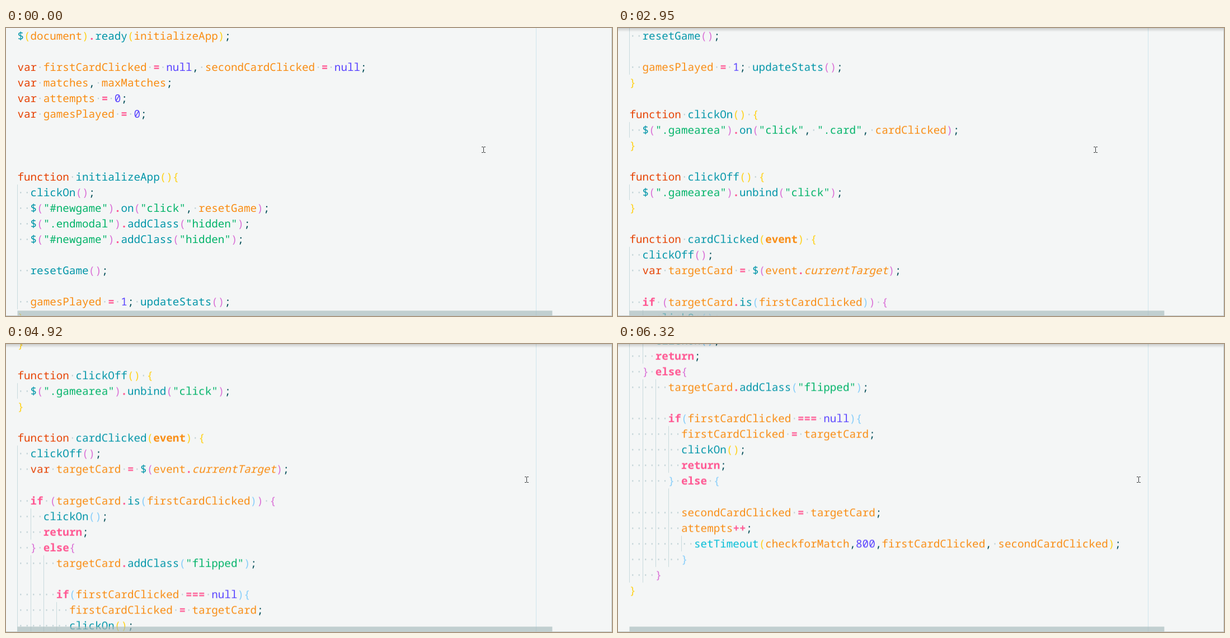
An HTML page that plays this animation: 1083x517 px, repeating every 8 s.

```html
<!DOCTYPE html>
<html lang="en">
<head>
<meta charset="utf-8">
<title>Code scrolling in an editor</title>
<style>
  html, body { margin: 0; width: 100%; height: 100%; overflow: hidden; background: #f4f6f6; }
  svg { display: block; width: 1083px; height: 517px; }
  text {
    font: 19.28px "Noto Sans Mono", "DejaVu Sans Mono", monospace;
    text-rendering: geometricPrecision;
    fill: #004d57;
  }
  .space { fill: #bccfd3; }
  .storage { fill: #e64100; }
  .control { fill: #ff5792; font-weight: bold; }
  .call { fill: #0095a8; }
  .builtin { fill: #00bdd6; }
  .name { fill: #f98c12; }
  .param { fill: #f98c12; font-weight: bold; }
  .prop { fill: #f98c12; font-style: italic; }
  .string { fill: #00b368; }
  .value { fill: #5842ff; }
  .depth0, .depth1, .depth2 { font-weight: 500; }
  .depth0 { fill: #ffd21a; }
  .depth1 { fill: #da70d6; }
  .depth2 { fill: #87cefa; }
  .guide { fill: #c8dadd; shape-rendering: crispEdges; }

  #code, #pointer, #shade { animation: 8s step-end infinite; }
  #code { animation-name: scroll; }
  #pointer { animation-name: move; }
  #shade { animation-name: shade; }

  /* One wheel notch is 3.75 lines, 105.3px. */
  @keyframes scroll {
    0% { transform: translateY(0); }
    9% { transform: translateY(-105.3px); }
    10.625% { transform: translateY(-210.6px); }
    12.25% { transform: translateY(-315.9px); }
    36.875% { transform: translateY(-421.2px); }
    38.5% { transform: translateY(-526.5px); }
    40.5% { transform: translateY(-631.8px); }
    75.625% { transform: translateY(-737.1px); }
    77.5% { transform: translateY(-842.4px); }
    79%, 100% { transform: translateY(-947.7px); }
  }
  @keyframes move {
    0% { transform: translate(850px, 213px); }
    52.75% { transform: translate(857px, 213px); }
    54.75% { transform: translate(881px, 222px); }
    56.625% { transform: translate(912px, 233px); }
    58.125% { transform: translate(925px, 237px); }
    60% { transform: translate(926px, 237px); }
    61.5%, 100% { transform: translate(927px, 238px); }
  }
  @keyframes shade {
    0% { opacity: 0; }
    9%, 100% { opacity: 1; }
  }
</style>
</head>
<body>
<svg viewBox="0 0 1083 517">
  <defs>
    <linearGradient id="fade" x2="0" y2="1">
      <stop stop-opacity=".17"/>
      <stop offset=".5" stop-opacity=".08"/>
      <stop offset="1" stop-opacity="0"/>
    </linearGradient>
  </defs>
  <rect width="1083" height="517" fill="#f4f6f6"/>
  <rect x="947" width="1" height="517" fill="#cfe5ed"/>
  <g id="code"></g>
  <rect id="shade" width="1083" height="7" fill="url(#fade)"/>
  <rect x="20.5" y="507.4" width="955.8" height="9.6" fill="#a6babc" fill-opacity=".65"/>
  <path d="M0 516.5H1083M1082.5 0V517" stroke="#c0c7c8"/>
  <path id="pointer" d="M0 .5H3M4 .5H7M3.5 1V10M0 10.5H3M4 10.5H7" fill="none" stroke="#3a3d3e"/>
</svg>
<script>
const source = `$(document).ready(initializeApp);

var firstCardClicked = null, secondCardClicked = null;
var matches, maxMatches;
var attempts = 0;
var gamesPlayed = 0;



function initializeApp(){
  clickOn();
  $("#newgame").on("click", resetGame);
  $(".endmodal").addClass("hidden");
  $("#newgame").addClass("hidden");

  resetGame();

  gamesPlayed = 1; updateStats();
}

function clickOn() {
  $(".gamearea").on("click", ".card", cardClicked);
}

function clickOff() {
  $(".gamearea").unbind("click");
}

function cardClicked(event) {
  clickOff();
  var targetCard = $(event.currentTarget);

  if (targetCard.is(firstCardClicked)) {
    clickOn();
    return;
  } else{
      targetCard.addClass("flipped");

      if(firstCardClicked === null){
        firstCardClicked = targetCard;
        clickOn();
        return;
      } else {

        secondCardClicked = targetCard;
        attempts++;
          setTimeout(checkforMatch,800,firstCardClicked, secondCardClicked);
        }
    }
}`;

const left = 20.4, charWidth = 11.568, lineHeight = 28.08, baseline = 21;
const tokens = /"[^"]*"|[a-z]\w*|\d+|[=+]+|./gi;
let depth = 0;

function kindOf(token, line, next) {
  if (token === " ") return "space";
  if (token[0] === '"') return "string";
  if (/^[({]$/.test(token)) return "depth" + depth++ % 3;
  if (/^[)}]$/.test(token)) return "depth" + --depth % 3;
  if (/^(var|function)$/.test(token)) return "storage";
  if (/^(if|else|return|[=+]+|\.)$/.test(token)) return "control";
  if (/^(null|\d+)$/.test(token)) return "value";
  if (token === "setTimeout") return "builtin";
  if (token === "currentTarget") return "prop";
  if (token === "$" || /^\w/.test(token) && next === "(") return "call";
  if (token === "event" && line.startsWith("function")) return "param";
  return /^\w/.test(token) ? "name" : "plain";
}

function paintLine(line) {
  return line.replace(tokens, (token, at) => {
    const kind = kindOf(token, line, line[at + token.length]);
    return `<tspan class="${kind}">${token === " " ? "·" : token}</tspan>`;
  });
}

const lines = source.split("\n");

// Blank lines take the indent of the next line with text.
function indentOf(row) {
  while (!lines[row]) row++;
  return lines[row].search(/\S/);
}

document.getElementById("code").innerHTML = lines.map((line, row) => {
  const top = row * lineHeight;
  let markup = "";
  for (let col = 0; col < indentOf(row); col += 2) {
    const x = Math.floor(left + 0.5 + col * charWidth);
    markup += `<rect class="guide" x="${x}" y="${top}" width="1" height="${lineHeight}"/>`;
  }
  return markup + `<text x="${left}" y="${top + baseline}">${paintLine(line)}</text>`;
}).join("");
</script>
</body>
</html>
```
